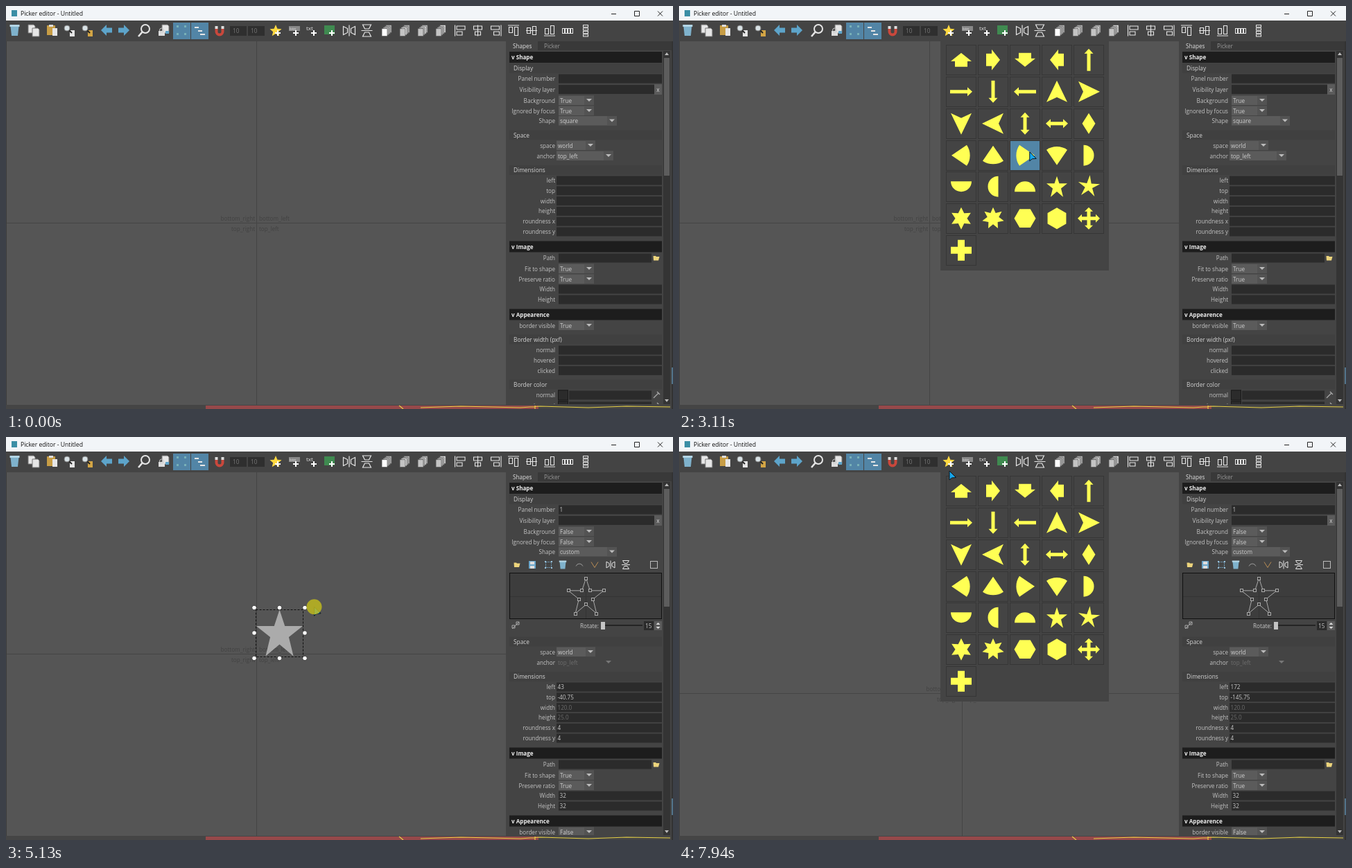
Write an HTML page with a canvas that moves like this. It is 962 px wide and 582 px high and loops after 8000 ms.

```html
<!DOCTYPE html>
<html lang="en">
<meta charset="utf-8">
<title>Picker editor</title>
<style>
html, body { margin: 0; width: 100%; height: 100%; overflow: hidden; background: #444 }
canvas { display: block }
</style>
<canvas id="stage" width="962" height="582"></canvas>
<script>
const g = document.getElementById('stage').getContext('2d');
const YELLOW = '#ffff54', BLUE = '#5285a6', ICON = '#e6e6e6', SCALE = 0.737;

// ---------- drawing helpers ----------
function rect(x, y, w, h, color) { g.fillStyle = color; g.fillRect(x, y, w, h); }
function frame(x, y, w, h, color, width = 1) {
  g.strokeStyle = color; g.lineWidth = width; g.strokeRect(x + .5, y + .5, w - 1, h - 1);
}
function text(s, x, y, color = '#c8c8c8', align = 'left', font = '8.15px') {
  g.font = font + ' "Open Sans", "Noto Sans", sans-serif';
  g.textAlign = align; g.fillStyle = color; g.fillText(s, x, y + 3);
}
function path(d, x, y, fill, stroke, width = 1, turns = 0) {
  g.save(); g.translate(x, y); g.rotate(turns * Math.PI / 2);
  const p = new Path2D(d);
  if (fill) { g.fillStyle = fill; g.fill(p); }
  if (stroke) { g.strokeStyle = stroke; g.lineWidth = width; g.stroke(p); }
  g.restore();
}
function circle(x, y, r, fill, stroke, width = 1) {
  g.beginPath(); g.arc(x, y, r, 0, 7);
  if (fill) { g.fillStyle = fill; g.fill(); }
  if (stroke) { g.strokeStyle = stroke; g.lineWidth = width; g.stroke(); }
}
const polygon = points => 'M' + points.join('L') + 'Z';
function star(n, outer, inner, turn = 0) {
  return polygon(Array.from({ length: 2 * n }, (_, i) => {
    const a = Math.PI * i / n + turn, r = i % 2 ? inner : outer;
    return [r * Math.sin(a), -r * Math.cos(a)];
  }));
}
// Five-pointed star filling a square of the given half size
function boxStar(size) {
  const side = [[.23, -.3], [1, -.3], [.4, .18], [.6, 1]];
  const mirrored = side.map(([x, y]) => [-x, y]).reverse();
  return [[0, -1], ...side, [0, .49], ...mirrored].map(([x, y]) => [x * size, y * size]);
}

// ---------- shape library ----------
const turned = (d, ...turns) => turns.map(n => [d, n]);
const DOUBLE = 'M0-16L6.5-9H2.5V9H6.5L0 16L-6.5 9H-2.5V-9H-6.5Z';
const SHAPES = [
  ...turned('M0-10L15 2H9V10H-9V2H-15Z', 0, 1, 2, 3),
  ...turned('M0-16L6.5-9H2.5V16H-2.5V-9H-6.5Z', 0, 1, 2, 3),
  ...turned('M0-16L15 15L0 8L-15 15Z', 0, 1, 2, 3),
  ...turned(DOUBLE, 0, 1),
  ['M0-15L9.5 0L0 15L-9.5 0Z', 0],
  ...turned('M0-14L15 8A26.6 26.6 0 0 1-15 8Z', 3, 0, 1, 2),
  ...turned('M-7.5-15A15 15 0 0 1-7.5 15Z', 0, 1, 2, 3),
  [polygon(boxStar(15)), 0], [star(5, 16.5, 5.5, .1), 0],
  [star(6, 16, 8.5), 0], [star(7, 16, 8.5), 0],
  [star(3, 15.5, 15.5, Math.PI / 6), 0], [star(3, 15.5, 15.5), 0],
  ['M0-16L6-10H2.5V-2.5H10V-6L16 0L10 6V2.5H2.5V10H6L0 16L-6 10H-2.5V2.5H-10V6L-16 0L-10-6V-2.5H-2.5V-10H-6Z', 0],
  ['M-5-15H5V-5H15V5H5V15H-5V5H-15V-5H-5Z', 0],
];

// ---------- toolbar ----------
const ARROW = 'M-8 0L0-8V-3.5H8V3.5H0V8Z';
const FLIP = 'M-8.5-6L-2.5-3V3L-8.5 6ZM8.5-6L2.5-3V3L8.5 6ZM0-8V8';
const SMALL_FLIP = 'M-6-4.5L-2-2V2L-6 4.5ZM6-4.5L2-2V2L6 4.5ZM0-6V6';

function trash(x, y, s = 1) {
  path(`M${-6 * s} ${-6 * s}H${6 * s}L${4.5 * s} ${8 * s}H${-4.5 * s}Z`, x, y, '#7fb2cc');
  rect(x - 7 * s, y - 8 * s, 14 * s, 3 * s, '#b4d6e6');
}
function sheet(x, y, color = ICON) {
  path('M-5-6H3L5-4V6H-5Z', x, y, color, '#777');
}
function clipboard(x, y) {
  path('M-7-7H5V7H-7Z', x, y, '#c79d45');
  rect(x - 4, y - 8, 6, 3, '#ddd');
  path('M-1-3H6V8H-1Z', x + 2, y, ICON);
}
function sheetLens(x, y, color) {
  path('M-3-4H4V5H-3Z', x + 4, y + 4, color);
  path('M0 0L5 5', x - 1, y - 1, null, '#222', 2);
  circle(x - 3, y - 3, 4, '#d8e2e6', '#888');
}
function plus(x, y) { path('M-4 0H4M0-4V4', x, y, null, '#fff', 2); }
function stack(x, y, front) {
  for (let i = 0; i < 4; i++)
    path('M-4-5.5H4V5.5H-4Z', x + 3 - i * 2, y - 2.5 + i * 1.7, i === front ? '#fff' : '#c4c4c4', '#555', .8);
}
function align(x, kind) {
  const far = kind % 3, bar = [-7.5, 0, 7.5][far];
  const long = [-5, -6, -7][far], short = [-5, -4, -3][far];
  path(`M${bar}-8V8M${long}-6.5h12v5h-12ZM${short} 1.5h8v5h-8Z`,
    x, 35.5, null, ICON, 1.1, kind < 3 ? 0 : 1);
}
function toolbar() {
  rect(0, 21, 962, 30, '#444');
  trash(12.5, 35);
  sheet(37, 33); sheet(43, 38);
  clipboard(66, 35);
  sheetLens(91, 35, ICON); sheetLens(117, 35, '#d3a545');
  path(ARROW, 145, 35, '#5da4ca'); path(ARROW, 170, 35, '#5da4ca', null, 1, 2);
  path('M-4 4L-10 11', 201, 33, null, ICON, 2.6); circle(201, 33, 6, null, ICON, 2);
  sheet(230, 33); rect(220, 36, 9, 7, '#ddd'); circle(224.5, 35, 3, null, '#ccc'); rect(230, 36, 5, 4, '#5da4ca');
  rect(241, 24, 25, 24, BLUE); rect(267, 24, 25, 24, BLUE);
  for (const [x, y] of [[246, 28], [257, 28], [246, 39], [257, 39]]) rect(x, y, 3, 3, '#78b0b8');
  path('M-7-5H-1M-2 0H4M1 5H8', 279, 36, null, ICON, 2);
  path('M-4.5-3V1A4.5 4.5 0 0 0 4.5 1V-3', 308, 36, null, '#c9483c', 4);
  path('M-4.5-7V-3M4.5-7V-3', 308, 36, null, '#ddd', 4);
  for (const x of [323, 349]) { rect(x, 29, 24, 14, '#2f2f2f'); text('10', x + 4, 36, '#777'); }
  path(star(5, 9, 4), 389, 36, '#ffd940'); plus(392, 39);
  rect(408, 29, 16, 7, '#888'); text('btn', 409, 32, '#ddd', 'left', '6px'); plus(418, 39);
  text('txt', 433, 32, ICON, 'left', '8px'); plus(444, 39);
  rect(459, 28, 15, 13, '#3f8a50'); plus(470, 39);
  path(FLIP, 495, 35.5, null, ICON, 1.2); path(FLIP, 520.5, 35.5, null, ICON, 1.2, 1);
  [549, 575, 601, 627].forEach((x, i) => stack(x, 35.5, 3 - i));
  [655, 680.5, 706.5, 732, 758, 784].forEach(align);
  for (let i = 0; i < 4; i++) {
    frame(802 + i * 4, 32, 4, 8, ICON); frame(832, 27 + i * 4.5, 8, 4, ICON);
  }
}

function windowChrome() {
  rect(0, 0, 962, 21, '#f2f5f8');
  rect(8, 6, 8, 9, '#3b8ea5');
  text('Picker editor - Untitled', 21, 11, '#111', 'left', '8.65px');
  path('M873 11.5H880M906.5 7.5H913.5V14.5H906.5ZM940 7.5L947 14.5M947 7.5L940 14.5', 0, 0, null, '#222');
  rect(0, 576, 962, 6, '#454545');
  rect(288, 577, 480, 5, '#96494a');
  path('M567 577L573 582M598 580L656 578L742 580L770 578L840 580L895 578L958 579M763 577V582', 0, 0, null, '#e5cf45', 1.2);
  rect(960, 51, 2, 531, '#333'); rect(960, 522, 2, 24, '#52738a');
}

// ---------- side panel ----------
const label = (s, y) => text(s, 792, y, '#c4c4c4', 'right');
function field(name, y, value = '', x = 797, right = 946, color = '#c8c8c8') {
  label(name, y);
  rect(x, y - 6.5, right - x, 13, '#2b2b2b');
  text(value, x + 1.5, y, color);
}
function combo(name, y, value, x = 797, right = 848, enabled = true) {
  label(name, y);
  if (enabled) { rect(x, y - 7, right - x, 13.5, '#5b5b5b'); rect(right - 14, y - 7, 14, 13.5, '#535353'); }
  text(value, x + 2, y, enabled ? '#cfcfcf' : '#6d6d6d');
  path('M-4-2H4L0 2Z', right - 7, y - .5, enabled ? '#bbb' : '#777');
}
function header(s, y) { rect(726, y - 8, 220, 16, '#1d1d1d'); text('v ' + s, 729, y, '#eee', 'left', 'bold 8.1px'); }
function section(s, y) { rect(726, y - 7, 220, 14, '#404040'); text(s, 732, y, '#d4d4d4', 'left', '500 8.3px'); }
function folder(x, y) { path('M-4.5-3H-1L0-2H4.5L3 3.5H-4Z', x, y, '#ecd47c'); }

function customEditor() {
  const y = 184.5;
  folder(737, y);
  rect(754, 179, 10, 11, '#6aa6cb'); rect(756, 180, 6, 4, '#ddd'); rect(756, 186, 6, 4, '#ddd');
  g.setLineDash([2, 1]); frame(778, 180, 9, 9, '#6f9fbd'); g.setLineDash([]);
  for (const [a, b] of [[777, 179], [786, 179], [777, 188], [786, 188]]) rect(a, b, 2, 2, '#9bc4dd');
  trash(803, y, .75);
  path('M-5 2A5.5 6 0 0 1 5 2', 827, y, null, '#999');
  path('M-5-4L0 4L5-4', 849, y, null, '#b98d55');
  path(SMALL_FLIP, 872, y, null, ICON, 1); path(SMALL_FLIP, 894, y, null, ICON, 1, 1);
  frame(929, 179, 11, 11, '#bbb');
  rect(726, 196, 220, 67, '#3d3d3d'); frame(726, 196, 220, 67, '#111');
  path('M836.5 197V262M727 230.5H945', 0, 0, null, '#343434');
  const points = boxStar(25.5);
  path(polygon(points), 836.5, 229.5, null, '#aaa');
  for (const [a, b] of points) {
    const x = Math.round(834 + a), py = Math.round(227 + b);
    rect(x, py, 5, 5, '#3d3d3d'); frame(x, py, 5, 5, '#aaa');
  }
  path('M-5 5L5-5M-5 0h4v4h-4ZM1-5h4v4h-4Z', 735, 272, null, '#aaa');
  text('Rotate:', 855, 272.5, '#c8c8c8', 'right');
  rect(862, 271, 56, 2, '#242424'); rect(858, 267, 6, 11, '#c4c4c4');
  rect(920, 266, 14, 13, '#2b2b2b'); text('15', 922, 272.5);
  rect(935, 266, 11, 13, '#5b5b5b');
  path('M-3-1.5L0-4.5L3-1.5ZM-3 1.5L0 4.5L3 1.5Z', 940.5, 272.5, '#ddd');
}

function panel(item) {
  const flag = item ? 'False' : 'True', when = v => item ? String(v) : '';
  rect(721, 51, 239, 525, '#444');
  rect(726, 51, 234, 13, '#393939'); rect(726, 51, 41, 14, '#444');
  text('Shapes', 731, 57.5, '#e0e0e0'); text('Picker', 776, 57.5, '#999');
  rect(948, 65, 10, 510, '#343434'); rect(949, 75, 8, 170, '#5d5d5d');
  path('M-3 2L0-2L3 2Z', 953, 69, '#bbb'); path('M-3-2L0 2L3-2Z', 953, 570, '#bbb');

  g.save(); g.beginPath(); g.rect(722, 65, 226, 510); g.clip();
  header('Shape', 74); section('Display', 90);
  field('Panel number', 105, when(1));
  field('Visibility layer', 120.5, '', 797, 935);
  rect(935, 113, 11, 15, '#5b5b5b'); text('x', 940.5, 120.5, '#ddd', 'center');
  combo('Background', 136.5, flag); combo('Ignored by focus', 151.5, flag);
  combo('Shape', 166, item ? 'custom' : 'square', 797, 881);
  if (item) { customEditor(); g.translate(0, 109); }
  section('Space', 186.5);
  combo('space', 201.5, 'world', 794, 850);
  combo('anchor', 216.5, 'top_left', 794, 876, !item);
  section('Dimensions', 237);
  const values = item ? [item.left, item.top, '120.0', '25.0', 4, 4] : [];
  ['left', 'top', 'width', 'height', 'roundness x', 'roundness y'].forEach((name, i) =>
    field(name, 252 + i * 14.8, values[i] ?? '', 794, 946, i === 2 || i === 3 ? '#6b6b6b' : '#c8c8c8'));
  header('Image', 347.5);
  field('Path', 364, '', 797, 931); folder(938, 364);
  combo('Fit to shape', 379.5, 'True'); combo('Preserve ratio', 394.5, 'True');
  field('Width', 409, when(32)); field('Height', 424, when(32));
  header('Appearence', 445.5);
  combo('border visible', 461.5, flag);
  section('Border width (pxf)', 481.5);
  ['normal', 'hovered', 'clicked'].forEach((name, i) => field(name, 497 + i * 14.8));
  section('Border color', 546.5);
  for (const y of [562, 578]) {
    field(y < 570 ? 'normal' : 'hovered', y, '', 812, 931);
    rect(796, y - 7.5, 15, 15, '#2b2b2b'); frame(796, y - 7.5, 15, 15, '#191919');
    path('M-4 4L3-3M1-5L5-1', 938, y, null, '#aaa', 1.3);
  }
  g.restore();
}

// ---------- viewport, menu and pointer ----------
function viewport(pan, item, pressed) {
  rect(0, 51, 722, 526, '#3c3c3c');
  g.save(); g.beginPath(); g.rect(1, 51, 720, 525); g.clip();
  rect(1, 51, 720, 525, '#555');
  const x = 362 + 47 * pan, y = 313.5 + 57 * pan;
  rect(Math.round(x) - 1, 51, 1, 525, '#454545'); rect(1, Math.round(y) - 1, 720, 1, '#454545');
  for (const [v, dy] of [['bottom', -7], ['top', 8]]) {
    text(v + '_right', x - 3, y + dy, '#424242', 'right');
    text(v + '_left', x + 3, y + dy, '#424242');
  }
  if (item) {
    const cx = Math.round(x + item.left * SCALE), cy = Math.round(y + item.top * SCALE);
    path(polygon(boxStar(33.5)), cx + .5, cy, pressed ? '#ababab' : YELLOW);
    g.setLineDash([3, 2]); frame(cx - 34, cy - 34, 69, 69, '#111'); g.setLineDash([]);
    for (const i of [-1, 0, 1]) for (const j of [-1, 0, 1])
      if (i || j) circle(cx + .5 + 36.5 * i, cy + 36.5 * j, 3.3, '#fff', '#222', .8);
  }
  g.restore();
}
function shapeMenu(pointer) {
  rect(377, 51, 243, 331, '#444');
  SHAPES.forEach(([d, turns], i) => {
    const x = 385 + Math.round(i % 5 * 45.9), y = 56 + Math.round((i / 5 | 0) * 45.85);
    const over = pointer && pointer.x >= x && pointer.x < x + 44 && pointer.y >= y && pointer.y < y + 44;
    if (over) rect(x, y, 44, 43, BLUE);
    frame(x, y, 44, 44, '#363636');
    path(d, x + 22, y + 21.7, YELLOW, null, 1, turns);
  });
}

const ease = (t, a, b) => { const u = Math.min(1, Math.max(0, (t - a) / (b - a))); return u * u * (3 - 2 * u); };

// Pointer moves: start time, end time, target x, target y
const MOVES = [
  [200, 960, 386, 37], [1950, 2540, 420, 114], [2600, 3450, 552, 263],
  [4130, 4750, 370, 308], [4905, 5310, 497, 201], [5700, 6250, 271, 148],
  [6350, 6820, 318, 205], [6900, 7560, 386, 37], [7780, 7940, 390, 49],
];
function pointerAt(t) {
  let x = 480, y = 580;
  for (const [a, b, tx, ty] of MOVES) { const k = ease(t, a, b); x += (tx - x) * k; y += (ty - y) * k; }
  return { x, y };
}
const between = (t, a, b) => t >= a && t < b;

function draw() {
  const t = performance.now() % 8000, pointer = pointerAt(t);
  const dragging = between(t, 4880, 5560);
  let item = null;
  if (t >= 4080) {
    const q = ease(t, 4998, 5403);
    item = { left: Math.round(172 * q), top: q ? .25 - Math.round(146 * q ** .92) : 0 };
  }
  viewport(ease(t, 6350, 6820), item, dragging);
  toolbar(); windowChrome(); panel(item);
  if (between(t, 1950, 4080) || t >= 7790) shapeMenu(t > 2600 && pointer);
  if (t >= 200) {
    path('M0 0V13L3.5 10L9.5 9.5Z', pointer.x, pointer.y, '#18a5ea', '#0c141a');
    if (dragging || between(t, 1810, 1930) || between(t, 3970, 4070) || between(t, 7640, 7760))
      circle(pointer.x, pointer.y, 11, 'rgba(190,184,30,.85)');
  }
  requestAnimationFrame(draw);
}
draw();
</script>
</html>
```
